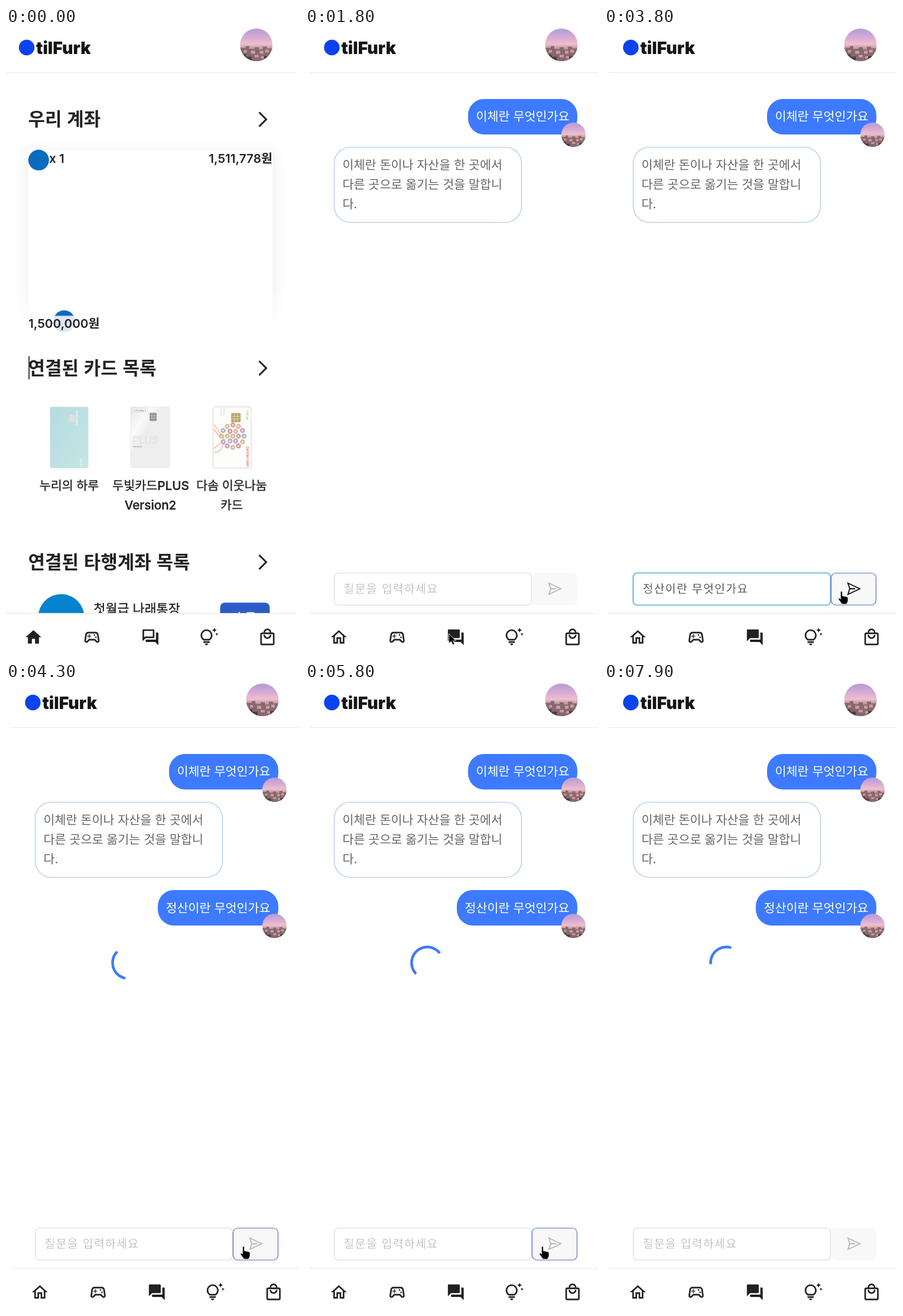
Animation of 496x1060 px, one loop 8000 ms. Source, as an HTML page:

```html
<!DOCTYPE html>
<html lang="ko">
<head>
<meta charset="utf-8">
<style>
  html, body { margin: 0; height: 100%; overflow: hidden; background: #fff; }
  svg { display: block; }
  text { font: 500 20.7px Inter, 'Noto Sans CJK KR', sans-serif; fill: #222; white-space: pre; }
  .title { font: 600 31px 'Noto Sans CJK KR', sans-serif; }
  .amount { font-weight: 600; }
  .label { stroke: #222; stroke-width: .35; }
  .brand { font: 900 28.5px Inter, sans-serif; fill: #151515; }
  .mid { text-anchor: middle; }
  .say { font: 500 20.7px 'Noto Sans CJK KR', sans-serif; fill: #fff; }
  .reply { font: 400 20.7px 'Noto Sans CJK KR', sans-serif; fill: #666; }
  .entry { font: 300 19.4px 'Noto Sans CJK KR', sans-serif; letter-spacing: 1.3px; stroke: #fff; stroke-width: .35; }
  .tiny { font: 500 4.5px Inter, sans-serif; fill: #888; }
  .icon { fill: #222; }
  .line { stroke: #e6e6e6; stroke-width: 1.2; }
</style>
</head>
<body>
<svg width="496" height="1060" viewBox="0 0 496 1060">
  <defs>
    <linearGradient id="sky" x2="0" y2="1">
      <stop offset="0" stop-color="#b39bd3"/>
      <stop offset=".25" stop-color="#d3a8d6"/>
      <stop offset=".48" stop-color="#efbfcb"/>
      <stop offset=".6" stop-color="#c59aa4"/>
      <stop offset="1" stop-color="#6b5058"/>
    </linearGradient>
    <linearGradient id="mint" x2="1" y2="1">
      <stop offset="0" stop-color="#b5dbe0"/><stop offset="1" stop-color="#c6e5e4"/>
    </linearGradient>
    <linearGradient id="pearl" x2="1" y2="1">
      <stop offset="0" stop-color="#e6e6e6"/><stop offset=".25" stop-color="#fafafa"/>
      <stop offset=".4" stop-color="#eeeeee"/><stop offset="1" stop-color="#efefee"/>
    </linearGradient>
    <linearGradient id="fadeOut" x2="0" y2="1">
      <stop offset=".8" stop-color="#fff"/><stop offset="1" stop-color="#000"/>
    </linearGradient>
    <mask id="shadeMask" maskUnits="userSpaceOnUse" x="0" y="150" width="496" height="362">
      <rect y="150" width="496" height="362" fill="url(#fadeOut)"/>
    </mask>
    <filter id="blur" x="-20%" y="-20%" width="140%" height="140%"><feGaussianBlur stdDeviation="12"/></filter>
    <clipPath id="round"><circle r="27.5"/></clipPath>
    <g id="avatar" clip-path="url(#round)">
      <rect x="-28" y="-28" width="56" height="56" fill="url(#sky)"/>
      <path d="M-28 5H-18V2H-12V7H-3V4H4V8H11V3H18V6H28V28H-28Z" fill="#866872"/>
      <path d="M-21 9h5v4h-5zM-9 10h7v5h-7zM6 10h6v5h-6zM15 8h6v5h-6zM-3 17h7v4h-7zM8 19h5v4h-5z" fill="#cf9e95"/>
      <path d="M-28 16h11v4h9v8h-20zM13 19h15v9H13z" fill="#4b3b45"/>
    </g>
    <path id="chevron" d="M428.5 -12L440.5 0 428.5 12" fill="none" stroke="#222" stroke-width="3"/>
    <g id="chip"><rect width="12" height="14" rx="2"/><path d="M0 5H12M0 9H12M4 0V14M8 0V14" stroke="#fff" stroke-width=".7" opacity=".6"/></g>
    <g id="header">
      <circle cx="35" cy="33" r="13.2" fill="#0a43ee"/>
      <text class="brand" x="51" y="44">tilFurk</text>
      <use href="#avatar" x="423.7" y="28.5"/>
      <path class="line" d="M-2.5 75.5H492"/>
    </g>
    <g id="navRest">
      <path class="line" d="M-2.5 989.5H492"/>
      <g class="icon">
        <path transform="translate(129.4 1014) scale(1.34)" d="M21.58 16.09l-1.09-7.66C20.21 6.46 18.52 5 16.53 5H7.47C5.48 5 3.79 6.46 3.51 8.43l-1.09 7.66C2.2 17.63 3.39 19 4.94 19c.68 0 1.32-.27 1.8-.75L9 16h6l2.25 2.25c.48.48 1.13.75 1.8.75 1.56 0 2.75-1.37 2.53-2.91zm-2.1.72c-.08.09-.21.19-.42.19-.15 0-.29-.06-.39-.16L15.83 14H8.17l-2.84 2.84c-.1.1-.24.16-.39.16-.3 0-.6-.3-.55-.63l1.09-7.66C5.63 7.74 6.48 7 7.47 7h9.06c.99 0 1.84.74 1.98 1.72l1.09 7.66c.03.2-.05.34-.12.43zM9 8H8v2H6v1h2v2h1v-2h2v-1H9zM14 9a1 1 0 0 1 2 0 1 1 0 0 1-2 0zM16 12a1 1 0 0 1 2 0 1 1 0 0 1-2 0z"/>
        <path transform="translate(327.4 1014) scale(1.34)" d="M7 20h4c0 1.1-.9 2-2 2s-2-.9-2-2zm-2-1h8v-2H5zm11.5-9.5c0 3.82-2.66 5.86-3.77 6.5H5.27c-1.11-.64-3.77-2.68-3.77-6.5C1.5 5.36 4.86 2 9 2s7.5 3.36 7.5 7.5zm-2 0C14.5 6.47 12.03 4 9 4S3.5 6.47 3.5 9.5c0 2.47 1.49 3.89 2.35 4.5h6.3c.86-.61 2.35-2.03 2.35-4.5zm6.87-2.13L20 8l1.37.63L22 10l.63-1.37L24 8l-1.37-.63L22 6zM19 6l.94-2.06L22 3l-2.06-.94L19 0l-.94 2.06L16 3l2.06.94z"/>
        <path transform="translate(426.4 1014) scale(1.34)" d="M19 6h-2c0-2.76-2.24-5-5-5S7 3.24 7 6H5c-1.1 0-2 .9-2 2v12c0 1.1.9 2 2 2h14c1.1 0 2-.9 2-2V8c0-1.1-.9-2-2-2zm-7-3c1.66 0 3 1.34 3 3H9c0-1.66 1.34-3 3-3zm7 17H5V8h14zm-7-8c-1.66 0-3-1.34-3-3H7c0 2.76 2.24 5 5 5s5-2.24 5-5h-2c0 1.66-1.34 3-3 3z"/>
      </g>
    </g>
  </defs>

  <g id="home">
    <use href="#header"/>
    <text class="title" x="37.5" y="165">우리 계좌</text>
    <use href="#chevron" y="154.5"/>
    <g mask="url(#shadeMask)"><rect x="32" y="206" width="425" height="310" fill="#000" opacity=".05" filter="url(#blur)"/></g>
    <rect x="38" y="206" width="413" height="310" fill="#fff"/>
    <circle cx="55.3" cy="223.3" r="17.5" fill="#0a6cbf"/>
    <text class="amount" x="73" y="228">x 1</text>
    <text class="amount" x="451" y="228" text-anchor="end">1,511,778원</text>
    <circle cx="98.5" cy="496" r="18.5" fill="#dfe8f6"/>
    <path d="M82.5 486.5A18.5 18.5 0 0 1 114.5 486.5Z" fill="#0a6cbf"/>
    <text class="amount" x="38" y="507">1,500,000원</text>

    <path d="M39 555V594" stroke="#111" stroke-width="1.6"/>
    <text class="title" x="37.5" y="586">연결된 카드 목록</text>
    <use href="#chevron" y="575"/>

    <rect x="74.5" y="640.5" width="65" height="103.5" rx="3" fill="url(#mint)"/>
    <use href="#chip" x="106" y="653" fill="#d3dcd9"/>
    <text class="tiny" transform="translate(118 647) rotate(90)" style="fill:#fff">NURI HARU</text>
    <text class="tiny" transform="translate(125 727) rotate(90)" style="fill:#fff">하루 01</text>
    <rect x="211" y="640.5" width="66" height="103" rx="3" fill="url(#pearl)" stroke="#e4e4e4" stroke-width=".7"/>
    <use href="#chip" x="243" y="650.5" fill="#8e8e8e"/>
    <rect x="214.5" y="643" width="25" height="6" rx="1" fill="#fff" stroke="#bbb" stroke-width=".5"/>
    <text class="tiny" x="216" y="647.5" style="font-size:4px">Everyday 2</text>
    <text x="214" y="703" style="font-size:17px;font-weight:400;fill:#f3f3f3;stroke:#d8d8d8;stroke-width:.6">PLUS</text>
    <text class="tiny" x="215" y="709" style="font-size:3.5px">Version2</text>
    <rect x="350.5" y="640.5" width="64.5" height="103.5" rx="3" fill="#fdfdfc" stroke="#d9d5d2"/>
    <use href="#chip" transform="translate(381 651) scale(1.35 1.1)" fill="#b9a56a"/>
    <path d="M352 671q9 9 11 17l8 9M352 718q11-1 14-10l5-8M352 678l11 15M352 711l12-10" fill="none" stroke="#f3cabd" stroke-width="2.2"/>
    <g id="dots" opacity=".75"></g>
    <text class="tiny" transform="translate(406.5 646) rotate(90)" style="fill:#8a9a6a">이웃나눔</text>
    <text class="tiny" transform="translate(407 708) rotate(90)" style="fill:#d25560;font-size:5px">DASOM CARD</text>
    <path d="M364 643V657M369 643V655" stroke="#d0d0d0"/>

    <g class="label">
      <text class="mid" x="107" y="781">누리의 하루</text>
      <text class="mid" x="245" y="781">두빛카드PLUS</text>
      <text class="mid" x="244.5" y="814">Version2</text>
      <text class="mid" x="382" y="781">다솜 이웃나눔</text>
      <text class="mid" x="382" y="814">카드</text>
      <text x="148.5" y="990" style="font-size:21.8px">첫월급 나래통장</text>
    </g>

    <text class="title" x="37.5" y="914">연결된 타행계좌 목록</text>
    <use href="#chevron" y="903"/>
    <circle cx="93.5" cy="996" r="39" fill="#0583cf"/>
    <rect x="362.5" y="971.5" width="84" height="50" rx="8" fill="#2d5cc6"/>
    <text class="mid" x="404.5" y="1004" style="fill:#fff">송금</text>
    <rect y="989" width="496" height="71" fill="#fff"/>
    <use href="#navRest"/>
    <path class="icon" transform="translate(30.4 1014) scale(1.34)" d="M10 20v-6h4v6h5v-8h3L12 3 2 12h3v8z"/>
    <path class="icon" transform="translate(228.4 1014) scale(1.34)" d="M15 4v7H5.17L4 12.17V4h11m1-2H3c-.55 0-1 .45-1 1v14l4-4h10c.55 0 1-.45 1-1V3c0-.55-.45-1-1-1zm5 4h-2v9H6v2c0 .55.45 1 1 1h11l4 4V7c0-.55-.45-1-1-1z"/>
  </g>

  <g id="chat">
    <g transform="translate(10.4)">
      <use href="#header"/>
      <use href="#navRest"/>
      <path class="icon" transform="translate(30.8 1014) scale(1.34)" d="M12 5.69l5 4.5V18h-2v-6H9v6H7v-7.81l5-4.5M12 3L2 12h3v8h6v-6h2v6h6v-8h3z"/>
      <path class="icon" transform="translate(228.8 1014) scale(1.34)" d="M21 6h-2v9H6v2c0 .55.45 1 1 1h11l4 4V7c0-.55-.45-1-1-1zm-4 6V3c0-.55-.45-1-1-1H3c-.55 0-1 .45-1 1v14l4-4h10c.55 0 1-.45 1-1z"/>
    </g>
    <rect x="276" y="120" width="185" height="60" rx="27" fill="#3d7aff"/>
    <text class="say" x="289.5" y="157">이체란 무엇인가요</text>
    <use href="#avatar" transform="translate(454.5 180.3) scale(.75)"/>
    <rect x="49.5" y="201.5" width="317" height="127" rx="27" fill="#fff" stroke="#a8c1ec" stroke-width="1.2"/>
    <text class="reply" x="63.5" y="239">이체란 돈이나 자산을 한 곳에서</text>
    <text class="reply" x="63.5" y="272">다른 곳으로 옮기는 것을 말합니</text>
    <text class="reply" x="63.5" y="305">다.</text>
    <g id="sent">
      <rect x="257" y="350" width="204" height="60" rx="27" fill="#3d7aff"/>
      <text class="say" x="270.5" y="388">정산이란 무엇인가요</text>
      <use href="#avatar" transform="translate(454.5 410.5) scale(.75)"/>
      <circle id="spinner" cx="207" cy="473" r="26.6" pathLength="126.9" fill="none" stroke="#3d7aff" stroke-width="4.5"/>
    </g>
    <rect id="glow" x="49.5" y="921.5" width="334" height="54" rx="7" fill="none" stroke="#8cc8f5" stroke-width="5" opacity=".35"/>
    <rect id="field" x="49.5" y="921.5" width="334" height="54" rx="7" fill="#fff" stroke-width="1.2"/>
    <text id="entry" class="entry" x="65.5" y="955"></text>
    <path id="caret" d="M0 935V961" stroke="#111" stroke-width="1.3"/>
    <rect id="button" x="384.5" y="921.5" width="76" height="54" rx="8" fill="#f8f8f8" stroke-width="1.2"/>
    <path id="arrow" d="M413 938.5L433 948 413 957.5 416 948ZM416 948H425" fill="none" stroke-width="1.9"/>
  </g>

  <g id="cursor">
    <path id="pointer" d="M0 0V16.5L4 13 6.7 19 9.5 17.8 6.8 12H12Z" stroke="#fff" stroke-width=".8"/>
    <circle id="press" r="5.2" fill="#e3231b"/>
    <path id="hand" d="M-1.5 1.5Q0-1.5 1.5 1.5V8L9 9.5Q11 10 11 12V17L8.5 22H1L-5 14Q-5.500 11-3 12L-1.500 13.500Z" stroke="#fff" stroke-width=".7"/>
  </g>
</svg>
<script>
const $ = id => document.getElementById(id);
const show = (id, on) => $(id).setAttribute('display', on ? 'inline' : 'none');
const set = (id, name, value) => $(id).setAttribute(name, value);

const LOOP = 8000, OPEN = 1600, FOCUS = 2500, TYPE = 2900, HOVER = 3600, SEND = 3980, LEAVE = 6000;
const QUESTION = '정산이란 무엇인가요', HINT = '질문을 입력하세요';
const route = [[700, 300, 760], [1100, 243.5, 1024], [1900, 243.5, 1024], [2400, 207, 954],
  [3300, 207, 954], [3700, 402, 952], [LOOP, 402, 952]];
const ease = x => (1 - Math.cos(Math.PI * x)) / 2;

// Badge cluster on the third card: a centre and two rings
const hues = ['#d9a07c', '#b58aa0', '#9a9ac2', '#cfae6c', '#c47f86'];
$('dots').innerHTML = Array.from({ length: 19 }, (_, i) => {
  const ring = i ? (i < 7 ? 9.5 : 19) : 0, angle = i * Math.PI / (i < 7 ? 3 : 6);
  const at = `cx="${384 + ring * Math.cos(angle)}" cy="${690 + ring * Math.sin(angle)}"`;
  return `<circle ${at} r="4.2" fill="${hues[i % 5]}"/><circle ${at} r="1.5" fill="#f6e8e0"/>`;
}).join('');

function position(t) {
  const next = Math.max(1, route.findIndex(p => p[0] > t));
  const [t0, x0, y0] = route[next - 1], [t1, x1, y1] = route[next];
  const k = ease(Math.max(0, (t - t0) / (t1 - t0)));
  return [x0 + (x1 - x0) * k, y0 + (y1 - y0) * k];
}

function spin(t) {
  const p = (t - SEND) / 1400 % 1, k = ease(p * 2 % 1);
  const [dash, offset] = p < .5 ? [1 + 99 * k, 15 * k] : [100, 15 + 110 * k];
  set('spinner', 'stroke-dasharray', dash + ' 200');
  set('spinner', 'stroke-dashoffset', -offset);
  set('spinner', 'transform', `rotate(${360 * p} 207 473)`);
}

function draw(now) {
  const t = Math.floor(now % LOOP / 100) * 100;
  const focused = t >= FOCUS && t < SEND, hover = t >= HOVER && t < LEAVE;
  const typed = focused ? QUESTION.slice(0, Math.max(0, Math.floor((t - TYPE) / 60))) : '';

  show('home', t < OPEN);
  show('chat', t >= OPEN);
  show('sent', t >= SEND);
  if (t >= SEND) spin(t);

  $('entry').textContent = typed || HINT;
  $('entry').style.fill = typed ? '#333' : '#b4b4b4';
  show('glow', focused && t >= TYPE);
  set('field', 'stroke', focused ? '#4a9cc4' : '#d9d9d9');
  show('caret', focused && t < HOVER);
  const end = typed && t < HOVER ? $('entry').getComputedTextLength() : 0;
  set('caret', 'transform', `translate(${65.5 + end})`);
  set('button', 'stroke', hover ? '#5a70d6' : '#f8f8f8');
  set('arrow', 'stroke', typed ? '#111' : '#b8b8b8');

  show('cursor', t >= 700 && t < LEAVE);
  show('press', t >= FOCUS && t < TYPE);
  show('hand', hover);
  show('pointer', t < FOCUS || t >= 3400 && t < HOVER);
  set('cursor', 'transform', `translate(${position(t)})`);
  requestAnimationFrame(() => draw(performance.now()));
}
draw(0);
</script>
</body>
</html>
```
